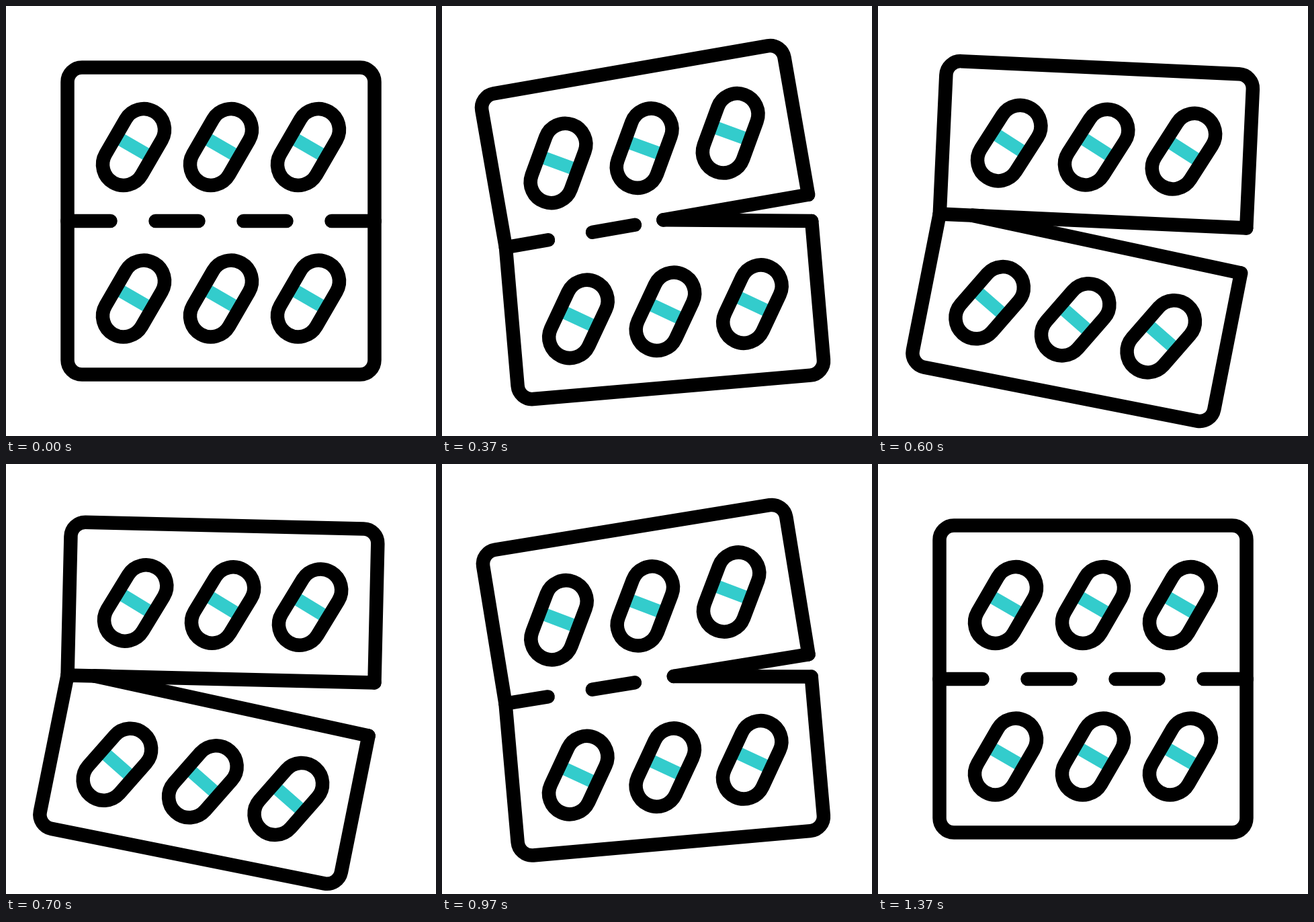
These frames come from a looping animation (640x640 px, 1.67 s). An HTML page with a canvas:

```html
<!DOCTYPE html>
<html>
<head>
<meta charset="utf-8">
<style>
  html, body { margin: 0; width: 100%; height: 100%; overflow: hidden; background: #fff; }
  canvas { display: block; }
</style>
</head>
<body>
<canvas id="stage" width="640" height="640"></canvas>
<script>
const ctx = document.getElementById('stage').getContext('2d');
const LOOP = 1670, LAST_STEP = 41;
const HALF = 228.5, RADIUS = 21.5;
const RAD = Math.PI / 180;

const linear = t => t;
const sine = t => (1 - Math.cos(Math.PI * t)) / 2;

// Value of a track of [step, value] keys
function track(step, keys, ease) {
  const next = keys.findIndex(key => key[0] > step);
  if (next === 0) return keys[0][1];
  if (next < 0) return keys[keys.length - 1][1];
  const [from, a] = keys[next - 1], [to, b] = keys[next];
  return a + (b - a) * ease((step - from) / (to - from));
}

// The pack rocks, the lower half swings open, the tear runs to the left and back
const tiltAt = step => RAD * track(step, [[3.9, 0], [10.5, -10], [19, 3.1], [27.4, -10], [36.4, 0]], sine);
const openAt = step => RAD * track(step, [[0, 0], [11.5, 5], [13, 5], [21, 10], [26.2, 4.6], [41, 0]], sine);
const tornAt = step => track(step, [[0, 0], [14, 0.61], [19.5, 1], [29, 0.445], [41, 0]], linear);

function line(x1, y1, x2, y2) {
  ctx.beginPath();
  ctx.moveTo(x1, y1);
  ctx.lineTo(x2, y2);
  ctx.stroke();
}

function pill(x, y) {
  ctx.save();
  ctx.translate(x, y);
  ctx.rotate(30 * RAD);
  ctx.fillStyle = '#33cccc';
  ctx.fillRect(-25, -10, 50, 19.5);
  ctx.beginPath();
  ctx.roundRect(-31, -61, 62, 122, 31);
  ctx.stroke();
  ctx.restore();
}

// Three-sided frame open at y = 0, extending up (dir -1) or down (dir 1)
function tray(dir, pillY) {
  const end = dir * HALF;
  ctx.beginPath();
  ctx.moveTo(HALF, 0);
  ctx.arcTo(HALF, end, -HALF, end, RADIUS);
  ctx.arcTo(-HALF, end, -HALF, 0, RADIUS);
  ctx.lineTo(-HALF, 0);
  ctx.stroke();
  for (const x of [-130, 0, 130]) pill(x, pillY);
}

function draw(step) {
  const open = openAt(step);
  const reach = 2 * HALF * (1 - tornAt(step));
  const apex = reach - HALF;

  ctx.clearRect(0, 0, 640, 640);
  ctx.save();
  ctx.lineWidth = 20.5;
  ctx.lineCap = ctx.lineJoin = 'round';
  ctx.translate(320, 320);
  ctx.rotate(tiltAt(step));

  tray(-1, -110);
  for (let i = 0; i < 4; i++) {
    const x = -HALF + i * 131;
    if (x < apex) line(x, 0, x + 64, 0);
  }
  line(apex, 0, HALF, 0);

  // The lower half hinges on the left corner
  ctx.translate(-HALF, 0);
  ctx.rotate(open);
  ctx.translate(HALF, 0);
  tray(1, 115.5);
  line(reach * Math.cos(open) - HALF, -reach * Math.sin(open), HALF, 0);
  ctx.restore();
}

function frame() {
  const time = performance.now() % LOOP;
  draw(Math.min(LAST_STEP, Math.floor((time + 3.4) * 0.03)));
  requestAnimationFrame(frame);
}
frame();
</script>
</body>
</html>
```
